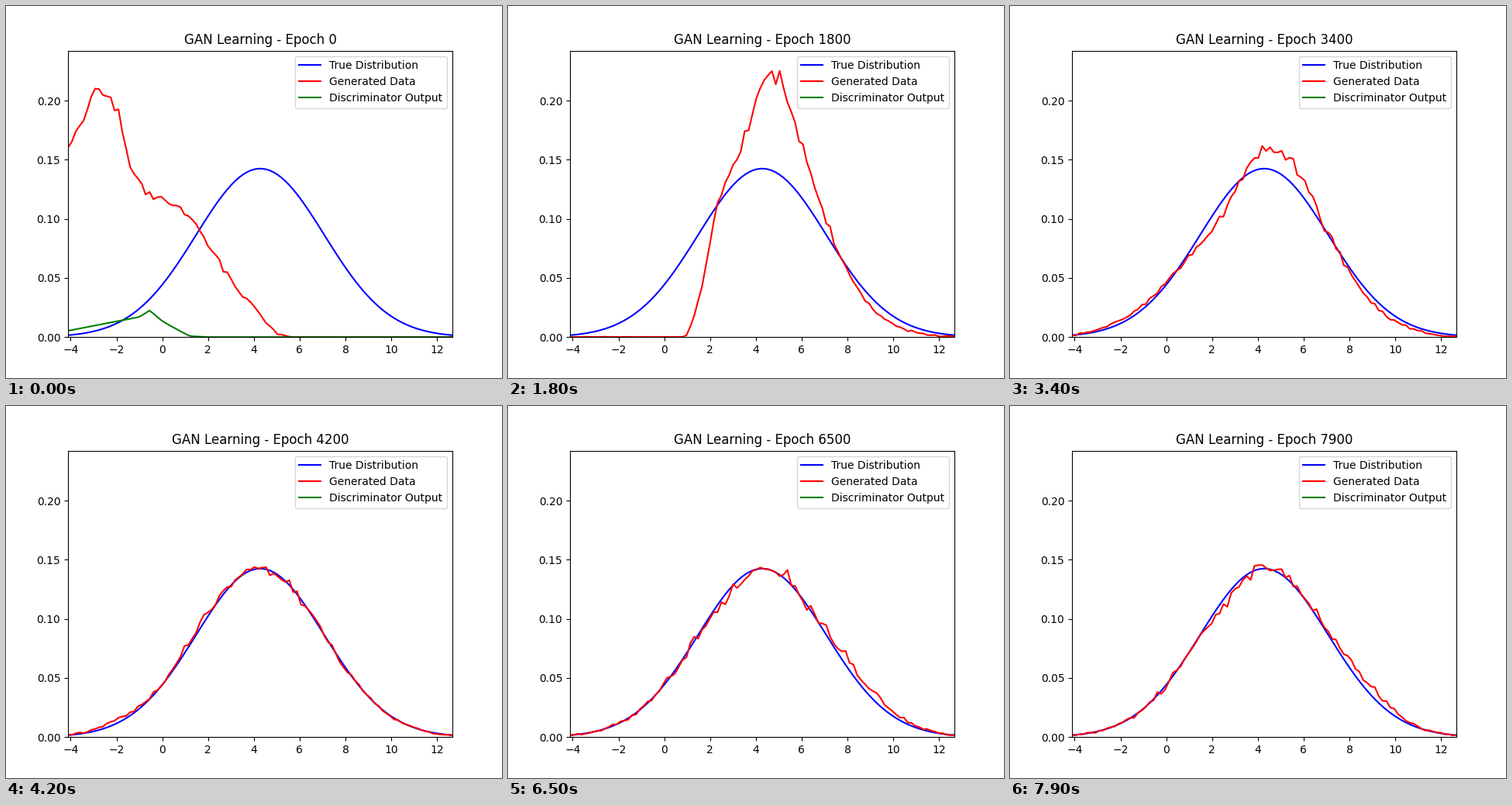
A matplotlib script for the animation above (8000 ms loop, 640x480 px).

```python
import numpy as np
import matplotlib.pyplot as plt
from matplotlib.animation import FuncAnimation

FRAMES, INTERVAL = 80, 100
MU, SIGMA = 4.278, 2.7985
N = 100
NOISE = 0.0075

plt.rcParams["font.family"] = "DejaVu Sans"

x = np.linspace(MU - 3 * SIGMA, MU + 3 * SIGMA, N)
dx = x[1] - x[0]
edges = np.append(x, x[-1] + dx) - dx / 2
quantiles = np.linspace(0, 1, 2001)


def bump(center, width, height):
    return height * np.exp(-0.5 * ((x - center) / width) ** 2)


def polyline(*points):
    px, py = zip(*points)
    return np.interp(x, px, py)


true_pdf = bump(MU, SIGMA, 1 / (SIGMA * np.sqrt(2 * np.pi)))

# Shapes the generator passes through
start = polyline((-4.1, 0.160), (-3.3, 0.19), (-2.8, 0.213), (-1.95, 0.197),
                 (-1.4, 0.145), (-0.7, 0.12), (0.6, 0.113), (1.3, 0.1),
                 (3.2, 0.041), (5, 0.003), (5.6, 0))
collapsed = bump(3, 2.82, 0.29) * np.clip((x - 2.83) / 0.45, 0, 1)
spread = bump(5, 2, 0.13) + bump(5.1, 1, 0.08) + bump(0.5, 1.7, 0.043)
settled = true_pdf + bump(1.7, 0.6, 0.004) + bump(-2, 1, 0.003)
dented = true_pdf + bump(0.6, 0.7, 0.006) - bump(2.6, 0.5, 0.008)
skewed = true_pdf + bump(8.5, 1.3, 0.007) - bump(2.5, 0.7, 0.006)

# (frame, density, easing power of the stage leading to it)
STAGES = [(0, start, 1), (9, collapsed, 1), (26, spread, 2), (42, settled, 0.6),
          (54, dented, 1), (65, skewed, 1), (79, skewed, 1)]

judge = polyline((-4.1, 0.0054), (-2, 0.0133), (-1, 0.017), (-0.55, 0.0225),
                 (0, 0.0135), (0.5, 0.008), (1.2, 0.0008), (2, 0.00001))
judge_logit = np.log(judge / (1 - judge))


def inverse_cdf(pdf):
    cdf = np.concatenate([[0], np.cumsum(pdf + 1e-9)])
    return np.interp(quantiles, cdf / cdf[-1], edges)


def morph(a, b, w):
    """Move the mass of density a towards density b."""
    q = (1 - w) * inverse_cdf(a) + w * inverse_cdf(b)
    cdf = np.interp(edges, q, quantiles, left=0, right=1)
    return np.diff(cdf) * ((1 - w) * a.sum() + w * b.sum())


def generated(frame):
    for (f0, a, _), (f1, b, power) in zip(STAGES, STAGES[1:]):
        if frame <= f1:
            break
    w = ((frame - f0) / (f1 - f0)) ** power
    pdf = a if w == 0 else b if w == 1 else morph(a, b, w)
    noise = np.random.default_rng(frame).standard_normal(N)
    return np.clip(pdf + NOISE * np.sqrt(pdf) * noise, 0, None)


def judged(frame):
    return 1 / (1 + np.exp(-judge_logit - 4 * frame))


fig, ax = plt.subplots(figsize=(6.4, 4.8), dpi=100)
ax.plot(x, true_pdf, color="blue", label="True Distribution")
gen_line, = ax.plot(x, start, color="red", label="Generated Data")
judge_line, = ax.plot(x, judge, color="green", label="Discriminator Output")
ax.set_xlim(x[0], x[-1])
ax.set_ylim(0, 1.7 / (SIGMA * np.sqrt(2 * np.pi)))
ax.legend(loc="upper right")
title = ax.set_title("GAN Learning - Epoch 0")


def update(frame):
    gen_line.set_ydata(generated(frame))
    judge_line.set_ydata(judged(frame))
    title.set_text(f"GAN Learning - Epoch {frame * 100}")
    return gen_line, judge_line, title


anim = FuncAnimation(fig, update, frames=FRAMES, interval=INTERVAL,
                     repeat=True, repeat_delay=0, blit=False)
plt.show()
```
